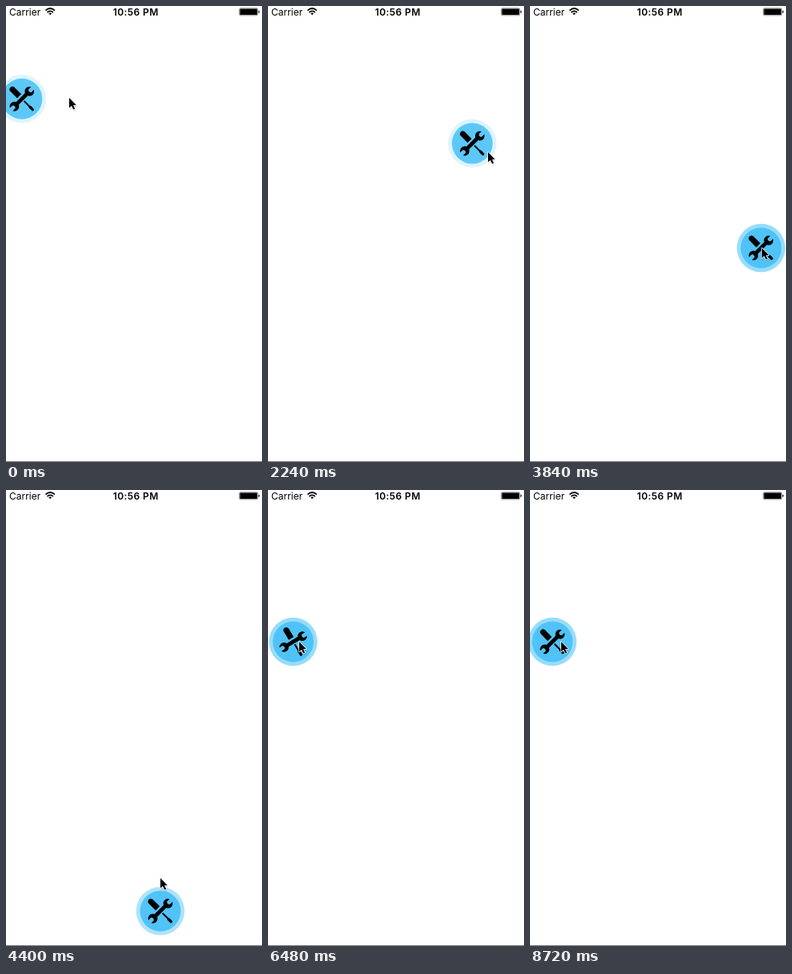
An HTML page for the animation above (8.8 s loop, 320 by 571 pixels).

```html
<!DOCTYPE html>
<html lang="en">
<head>
<meta charset="utf-8">
<title>Floating tool button</title>
<style>
  html, body { margin: 0; width: 100%; height: 100%; overflow: hidden; background: #fff; }
  svg { display: block; width: 100%; height: 100%; }
  text { font: 12px Inter, Roboto, sans-serif; fill: #000; }
  .clock { font-weight: 600; letter-spacing: .4px; }
</style>
</head>
<body>
<svg viewBox="0 0 320 571" xmlns="http://www.w3.org/2000/svg">
  <defs>
    <path id="jaw" d="M5.3 2.5A5.9 5.9 0 1 1 5.3-2.5L.6-2.5Q-1.8 0 .6 2.5Z"/>
    <path id="arrow" d="M0 0V14L3.3 11 5.8 16.2 8 15.2 5.6 10.3 9.8 10Z"/>
    <filter id="soft" x="-50%" y="-50%" width="200%" height="200%">
      <feGaussianBlur stdDeviation="1"/>
    </filter>
  </defs>
  <rect width="320" height="571" fill="#fff"/>

  <text x="4" y="11.6">Carrier</text>
  <g fill="none" stroke="#000" stroke-width="1.7">
    <path d="M49.5 5.6Q55.2 .4 60.9 5.6"/>
    <path d="M51.5 8Q55.2 4.7 58.9 8"/>
    <path d="M53.3 9.2Q55.2 7.6 57.1 9.2L55.2 11.2Z" fill="#000" stroke="none"/>
  </g>
  <text class="clock" x="162.2" y="11.6" text-anchor="middle">10:56 PM</text>
  <rect x="291.6" y="2.8" width="23.2" height="9" rx="1.6" fill="#fff" stroke="#444" stroke-width=".6"/>
  <rect x="292.4" y="3.6" width="21.6" height="7.4" rx=".8"/>
  <path d="M315.5 5.6Q317 5.9 317 7.3T315.5 9Z" fill="#222"/>

  <g id="button">
    <circle id="ring" r="30.3" fill="#4fc3f7"/>
    <circle id="disc" r="25.5" fill="#4fc3f7"/>
    <g id="tools">
      <g transform="rotate(45)">
        <path d="M-17-3.6H-4.8V3.6H-17Q-20.4 3.2-20.4 0T-17-3.6Z"/>
        <path d="M3.8-1H12.5L14.5-1.7H19.5Q22 0 19.5 1.7H14.5L12.5 1H3.8Z"/>
      </g>
      <g transform="rotate(-45)">
        <rect x="-10" y="-2.4" width="20" height="4.8"/>
        <use href="#jaw" x="13.4"/>
        <use href="#jaw" x="13.4" transform="rotate(180)"/>
      </g>
    </g>
  </g>

  <g id="cursor">
    <g transform="translate(0 1) scale(.9)">
      <use href="#arrow" x=".8" y="2" opacity=".28" filter="url(#soft)"/>
      <use href="#arrow" stroke="#fff" stroke-width="1.6" paint-order="stroke" stroke-linejoin="round"/>
    </g>
  </g>
  <rect y="570" width="320" height="1" fill="#777"/>
</svg>
<script>
const LOOP = 8800, SNAP = 91, FADE = 100;
const DIM = .19, LIT = .58;

const at = (x, y) => ({ x, y });
const mix = (a, b, u) => a + (b - a) * u;
const between = (p, q, u) => at(mix(p.x, q.x, u), mix(p.y, q.y, u));
const smooth = u => { u = Math.min(1, Math.max(0, u)); return u * u * (3 - 2 * u); };
const settle = (ms, tau) => 1 - Math.exp(-ms / tau);

// The button is dragged from grab to release, then snaps to rest at an edge
const home = at(-2, 113);
const drags = [
  { grab: -300, release: 960, drop: at(150, 136), rest: at(31, 160) },
  { grab: 1600, release: 2240, drop: at(255, 172), rest: at(289, 178) },
  { grab: 2900, release: 3260, drop: at(191, 293), rest: at(289, 303) },
  { grab: 3860, release: 4280, drop: at(193, 489), rest: at(193, 541) },
  { grab: 5120, release: 5680, drop: at(132.5, 191.5), rest: at(31.5, 190) }
];
const SWING = 5680, SLIDE = 6480;

// Stops of the pointer: time and tip
const stops = [
  [0, at(79, 114)], [700, at(172, 140)], [1280, at(171, 170)], [1600, at(45, 162)],
  [2240, at(275, 182)], [2900, at(290, 180)], [3200, at(183, 314)], [3860, at(290, 302)],
  [4400, at(193, 485)], [5120, at(193, 535)], [5600, at(115, 188)], [5760, at(112, 188)],
  [6320, at(39, 189)]
];

function buttonState(t) {
  const i = drags.findLastIndex(d => d.grab <= t), d = drags[i];
  const from = i ? drags[i - 1].rest : home;
  if (t < d.release) {
    const u = smooth((t - d.grab) / (d.release - d.grab));
    const fade = i ? settle(t - d.grab, FADE) : 1;
    return { pos: between(from, d.drop, u), glow: mix(LIT, DIM, fade) };
  }
  const pos = between(d.drop, d.rest, settle(t - d.release, SNAP));
  pos.x -= 3.5 * smooth((t - SLIDE) / (LOOP - SLIDE));
  return { pos, glow: mix(DIM, LIT, settle(t - d.release, FADE)) };
}

function cursorPos(t) {
  const i = stops.findLastIndex(s => s[0] <= t);
  const [t0, p] = stops[i], [t1, q] = stops[i + 1] || [LOOP, p];
  return between(p, q, smooth((t - t0) / (t1 - t0)));
}

// One damped swing after the last throw
function spin(t) {
  const u = Math.max(0, t - SWING) / 800;
  return 14 * (u * Math.exp(1 - u)) ** 2;
}

const el = id => document.getElementById(id);
const button = el("button"), ring = el("ring"), disc = el("disc");
const tools = el("tools"), cursor = el("cursor");
const place = (node, p) =>
  node.setAttribute("transform", `translate(${p.x.toFixed(2)} ${p.y.toFixed(2)})`);

function draw(t) {
  const { pos, glow } = buttonState(t);
  place(button, pos);
  place(cursor, cursorPos(t));
  ring.setAttribute("opacity", glow.toFixed(3));
  disc.setAttribute("opacity", Math.min(1, .84 + glow * .28).toFixed(3));
  tools.setAttribute("transform", `rotate(${spin(t).toFixed(2)})`);
}

const start = performance.now();
function tick() {
  draw(Math.max(0, performance.now() - start) % LOOP);
  requestAnimationFrame(tick);
}
draw(0);
requestAnimationFrame(tick);
</script>
</body>
</html>
```
